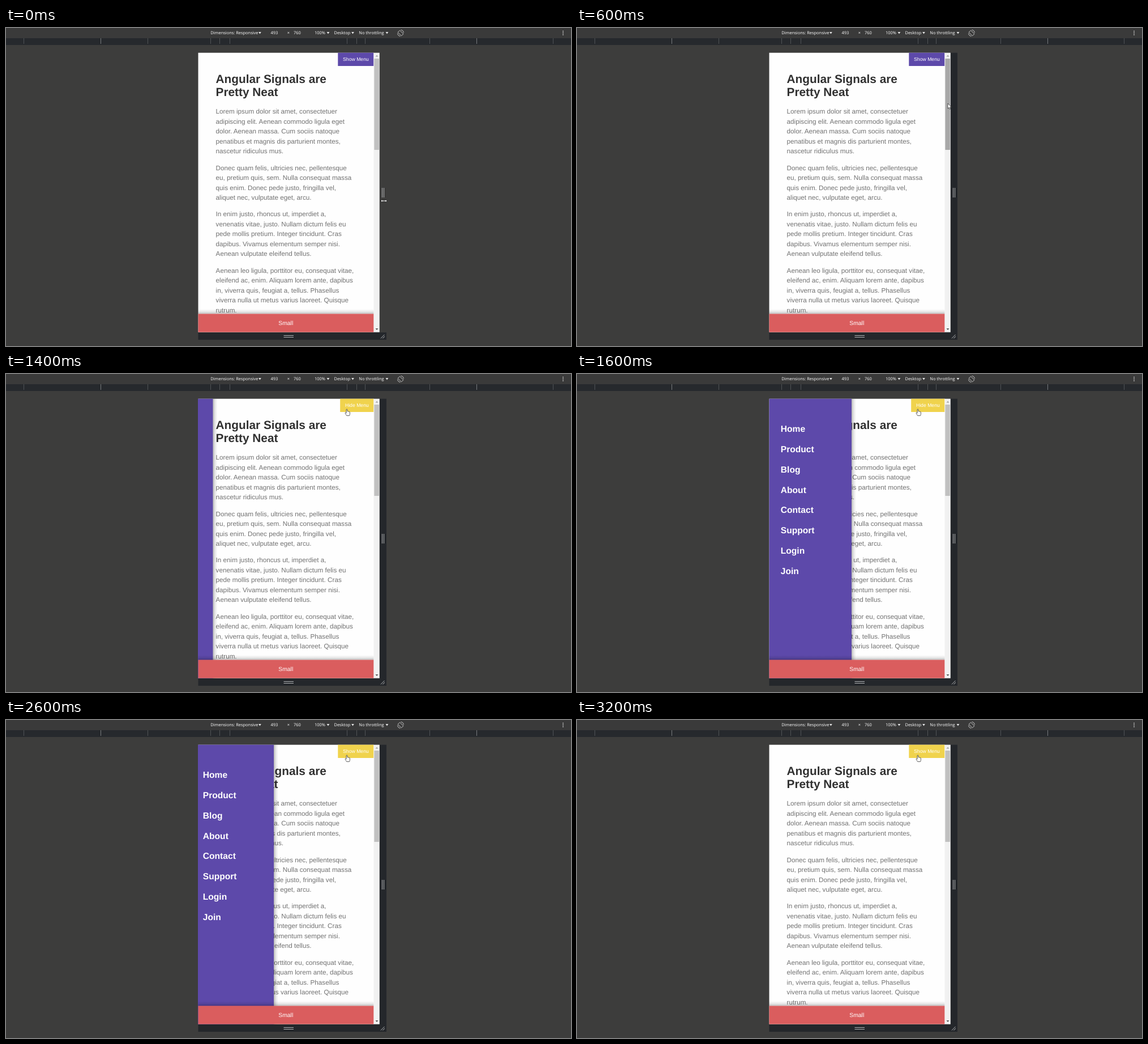
An HTML page that plays this animation: 998 px wide and 561 px high, repeating every 3600 ms.

```html
<!DOCTYPE html>
<html lang="en">
<head>
<meta charset="utf-8">
<title>Responsive side menu</title>
<style>
  html, body { margin: 0; width: 100%; height: 100%; overflow: hidden; background: #3d3d3c; }
  svg { display: block; width: 998px; height: 561px; }
  text { font-family: "Liberation Sans", Arial, sans-serif; text-rendering: geometricPrecision; white-space: pre; }
  .bar text { font: 7.45px "Open Sans", "Noto Sans", sans-serif; fill: #fff; }
  .bar path { fill: #e6e6e6; }
  .title text { font-size: 20.8px; font-weight: bold; fill: #313131; }
  .copy text { font-size: 11.7px; fill: #727272; }
  .menu text { font-size: 15.6px; font-weight: bold; fill: #fff; }
  .grip { stroke: #b4b6b8; stroke-width: 1; fill: none; }
  .cursor { stroke: #222; stroke-width: .7; fill: #fff; stroke-linejoin: round; }
</style>
</head>
<body>
<svg viewBox="0 0 998 561">
  <defs>
    <clipPath id="page"><rect x="339" y="43" width="310.600" height="494"/></clipPath>
    <linearGradient id="up" x1="0" y1="1" x2="0" y2="0">
      <stop offset="0" stop-color="#000" stop-opacity=".25"/>
      <stop offset=".45" stop-color="#000" stop-opacity=".09"/>
      <stop offset="1" stop-color="#000" stop-opacity="0"/>
    </linearGradient>
    <linearGradient id="side">
      <stop offset="0" stop-color="#000" stop-opacity=".28"/>
      <stop offset=".45" stop-color="#000" stop-opacity=".1"/>
      <stop offset="1" stop-color="#000" stop-opacity="0"/>
    </linearGradient>
  </defs>

  <rect width="998" height="561" fill="#3d3d3c"/>
  <rect width="998" height="18" fill="#3a3a3a"/>
  <rect y="18" width="998" height="12" fill="#26292d"/>
  <g id="ticks"></g>
  <g class="bar" id="bar"></g>
  <g fill="none" stroke="#d8d8d8" stroke-width=".9">
    <rect x="694.5" y="4.500" width="5" height="9" rx=".8" transform="rotate(-45 697 9)"/>
    <path d="M697.5 3.4a5.4 5.4 0 0 1 4.8 5M696.5 14.4a5.4 5.4 0 0 1-4.8-5"/>
  </g>
  <g fill="#dcdcdc">
    <circle cx="984" cy="5.6" r=".9"/><circle cx="984" cy="8.7" r=".9"/><circle cx="984" cy="11.8" r=".9"/>
  </g>

  <rect x="339.500" y="536.500" width="332.500" height="13.500" fill="#24272b"/>
  <rect id="strip" x="659.500" y="43.700" width="12.500" height="493.300"/>
  <path class="grip" d="M664.500 282v17M667.500 282v17M490.500 542.500h17.500M490.500 545.500h17.500M662 547.500l6.500-6.500M665.500 547.500l3.500-3.500"/>

  <rect x="339.500" y="43.700" width="310.500" height="493" fill="#fefefe"/>
  <g clip-path="url(#page)">
    <g class="title" id="title"></g>
    <g class="copy" id="copy"></g>
    <rect id="button" y="43.700" height="23.300"/>
    <text id="label" x="640.8" y="58.200" font-size="8.67" fill="#fff" text-anchor="end"></text>
    <g class="menu" id="menu">
      <rect x="339.500" y="43.700" width="145.500" height="493" fill="#5d49aa"/>
      <rect x="485" y="43.700" width="8" height="493" fill="url(#side)"/>
    </g>
    <rect x="339.500" y="496" width="311" height="8.300" fill="url(#up)"/>
    <rect x="339.500" y="504.300" width="311" height="32.300" fill="#da5d5e"/>
    <text x="494.200" y="524.100" font-size="10.4" fill="#fff" text-anchor="middle">Small</text>
  </g>

  <rect x="649.600" y="43.700" width="10.200" height="493" fill="#f1f1f1"/>
  <rect id="thumb" x="650.400" y="54" width="8.600" height="161"/>
  <path d="M652.500 50.500l2.500-2.800l2.500 2.800z" fill="#a3a3a3"/>
  <path d="M652.500 530l2.500 2.800l2.500-2.800z" fill="#505050"/>

  <g id="resize"><path class="cursor" d="M-5.500 0L-2.800-2.600V-.9H2.800V-2.600L5.500 0L2.800 2.600V.9H-2.800V2.600z"/></g>
  <g id="arrow"><path class="cursor" d="M0 0V9.200L2 7.300L3.400 10.300L4.900 9.600L3.500 6.700H6.300z"/></g>
  <g id="hand"><path class="cursor" d="M-1.700 1.200Q-1.700 0-.8 0T.1 1.200V3.800Q1.200 3.300 1.700 4.200Q2.700 3.800 3.200 4.600Q4.600 4.400 4.600 5.800V8Q4.600 9.700 3.700 11.500H-1.100Q-2.100 9.800-3.500 7.700Q-4.200 6.300-3.200 6.100Q-2.400 6-1.700 7.200z"/></g>
</svg>

<script>
const $ = id => document.getElementById(id);

function add(parent, tag, attrs, content = "") {
  const el = document.createElementNS("http://www.w3.org/2000/svg", tag);
  for (const key in attrs) el.setAttribute(key, attrs[key]);
  el.textContent = content;
  $(parent).append(el);
}

const ticks = [31, 167, 250, 361, 377, 395, 602, 619, 634, 748, 831, 966];
ticks.forEach(x => add("ticks", "rect", {
  x, y: 18, width: 1, height: 10, fill: x === 167 || x === 831 ? "#777a7d" : "#505356"
}));

const barItems = [
  [361.3, "Dimensions: Responsive", 448.4], [467.5, "493"], [496.8, "×"], [508, "760"],
  [545, "100%", 569], [579.5, "Desktop", 612.5], [623.3, "No throttling", 673]
];
for (const [x, text, caret] of barItems) {
  add("bar", "text", { x, y: 11.4 }, text);
  if (caret) add("bar", "path", { d: `M${caret - 2.4} 7h4.8l-2.4 3.6z` });
}

["Angular Signals are", "Pretty Neat"].forEach((line, i) =>
  add("title", "text", { x: 370.6, y: 97 + i * 23.4 }, line));

const paragraphs = [
  ["Lorem ipsum dolor sit amet, consectetuer", "adipiscing elit. Aenean commodo ligula eget",
   "dolor. Aenean massa. Cum sociis natoque", "penatibus et magnis dis parturient montes,", "nascetur ridiculus mus."],
  ["Donec quam felis, ultricies nec, pellentesque", "eu, pretium quis, sem. Nulla consequat massa",
   "quis enim. Donec pede justo, fringilla vel,", "aliquet nec, vulputate eget, arcu."],
  ["In enim justo, rhoncus ut, imperdiet a,", "venenatis vitae, justo. Nullam dictum felis eu",
   "pede mollis pretium. Integer tincidunt. Cras", "dapibus. Vivamus elementum semper nisi.", "Aenean vulputate eleifend tellus."],
  ["Aenean leo ligula, porttitor eu, consequat vitae,", "eleifend ac, enim. Aliquam lorem ante, dapibus",
   "in, viverra quis, feugiat a, tellus. Phasellus", "viverra nulla ut metus varius laoreet. Quisque", "rutrum."]
];
let y = 151.2;
for (const lines of paragraphs) {
  for (const line of lines) {
    add("copy", "text", { x: 370.6, y }, line);
    y += 17.53;
  }
  y += 11.7;
}

["Home", "Product", "Blog", "About", "Contact", "Support", "Login", "Join"].forEach((item, i) =>
  add("menu", "text", { x: 359.8, y: 102 + i * 35.85 }, item));

const purple = "#5d49aa", blend = "#765d9b", yellow = "#f0d34d";
const closed = -160;

// Each step lists only what changes; the rest carries over.
const steps = [
  { at: 0, cursor: "resize", x: 667.5, y: 305, strip: "#3d3d3c", thumb: "#c1c1c1", button: purple, label: "Show Menu", menu: closed },
  { at: 200, x: 662.5, y: 289 },
  { at: 400, cursor: "arrow", x: 655, y: 203, thumb: "#a8a8a8" },
  { at: 600, x: 655, y: 133, strip: "#24272b" },
  { at: 800, x: 607.5, y: 87, thumb: "#c1c1c1" },
  { at: 1000, cursor: "hand", x: 603.8, y: 65.8, button: blend },
  { at: 1200, x: 602.8, y: 62, button: yellow },
  { at: 1400, label: "Hide Menu", menu: -119.5 },
  { at: 1600, menu: 0 },
  { at: 2600, label: "Show Menu", menu: -12 },
  { at: 2800, menu: closed }
];
for (let i = 1; i < steps.length; i++) steps[i] = { ...steps[i - 1], ...steps[i] };

let shown;
function draw(now) {
  const time = now % 3600;
  const step = steps.findLast(s => s.at <= time);
  if (step === shown) return;
  shown = step;
  for (const id of ["resize", "arrow", "hand"]) {
    $(id).style.display = id === step.cursor ? "" : "none";
  }
  $(step.cursor).setAttribute("transform", `translate(${step.x} ${step.y})`);
  $("strip").setAttribute("fill", step.strip);
  $("thumb").setAttribute("fill", step.thumb);
  $("label").textContent = step.label;
  const left = step.label === "Show Menu" ? 586.3 : 590.2;
  $("button").setAttribute("x", left);
  $("button").setAttribute("width", 649.6 - left);
  $("button").setAttribute("fill", step.button);
  $("menu").setAttribute("transform", `translate(${step.menu} 0)`);
}

const start = performance.now();
function tick() {
  draw(performance.now() - start);
  requestAnimationFrame(tick);
}
tick();
</script>
</body>
</html>
```
